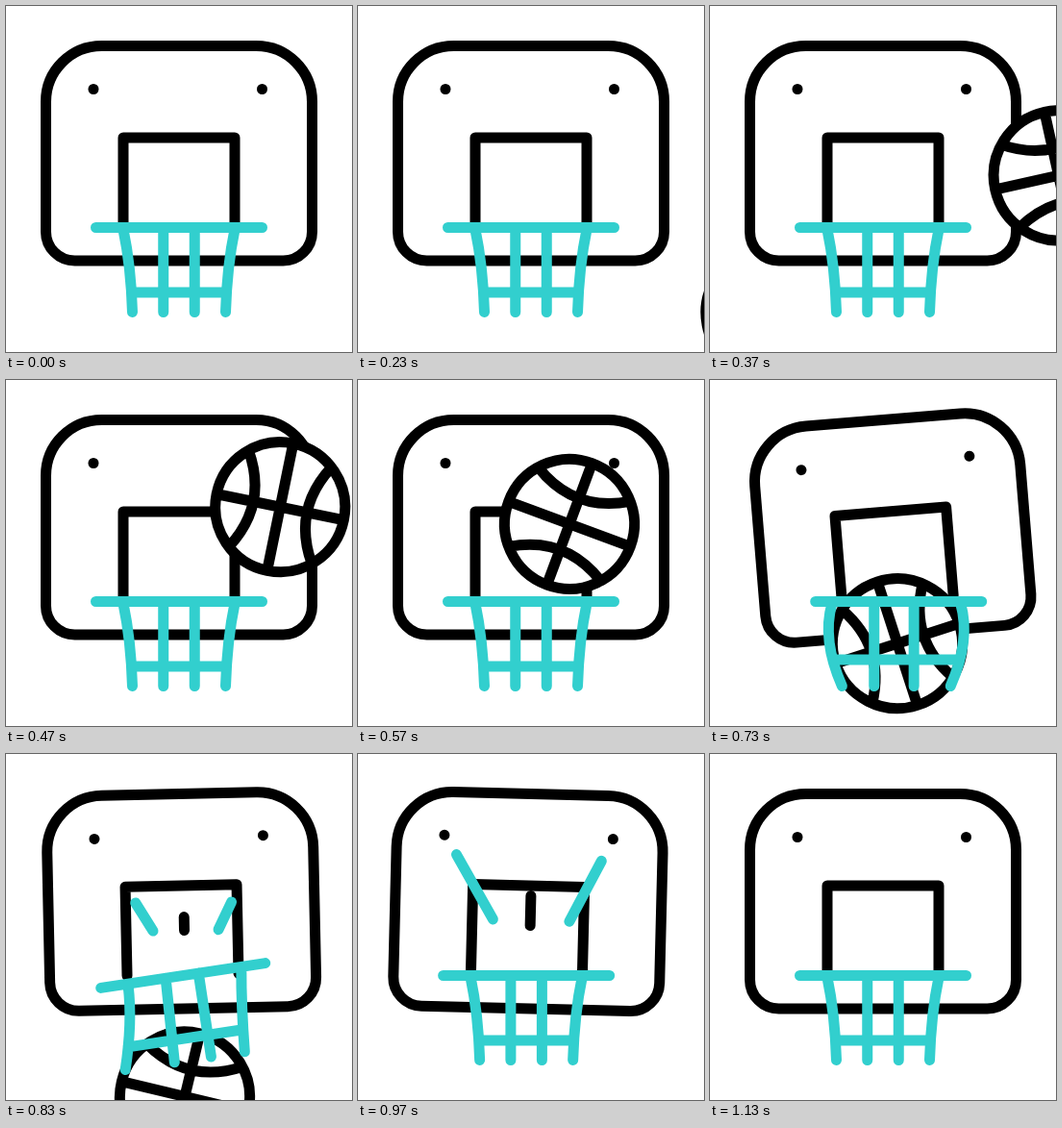
An HTML page with a canvas for the animation above (1670 ms loop, 360 by 360 pixels).

```html
<!DOCTYPE html>
<html lang="en">
<head>
<meta charset="utf-8">
<title>Basketball hoop</title>
<style>
  html, body { margin: 0; width: 100%; height: 100%; overflow: hidden; background: #fff; }
  canvas { display: block; }
</style>
</head>
<body>
<canvas id="stage" width="360" height="360"></canvas>
<script>
const LOOP = 1670, TEAL = '#32cfce', BLACK = '#000', RAD = Math.PI / 180;
const ctx = document.getElementById('stage').getContext('2d');

const progress = (t, from, to) => Math.min(1, Math.max(0, (t - from) / (to - from)));
const ease = (t, from, to) => (1 - Math.cos(Math.PI * progress(t, from, to))) / 2;
// Rises from 0 to 1, then falls back to 0.
const pulse = (t, from, peak, to) => ease(t, from, peak) - ease(t, peak, to);

// The ball rises to its apex, falls onto the rim, then pushes through the net.
function ballHeight(t) {
  const rise = 1 - Math.sin(Math.PI / 2 * progress(t, 200, 490));
  const fall = progress(t, 490, 700) ** 2;
  const push = Math.max(0, t - 700);
  return 131 + 226 * rise + 127 * fall + 0.45 * push + 0.0023 * push ** 2;
}

function stroke(color, draw) {
  ctx.strokeStyle = color;
  ctx.beginPath();
  draw();
  ctx.stroke();
}

function line(x1, y1, x2, y2) {
  ctx.moveTo(x1, y1);
  ctx.lineTo(x2, y2);
}

function curve(x1, y1, cx, cy, x2, y2) {
  ctx.moveTo(x1, y1);
  ctx.quadraticCurveTo(cx, cy, x2, y2);
}

function dot(x, y, r) {
  ctx.beginPath();
  ctx.arc(x, y, r, 0, 7);
  ctx.fill();
}

function place(x, y, degrees, draw) {
  ctx.save();
  ctx.translate(x, y);
  ctx.rotate(degrees * RAD);
  draw();
  ctx.restore();
}

function drawBoard() {
  stroke(BLACK, () => {
    ctx.roundRect(-138.5, 0, 277, 223.5, [58, 58, 30, 30]);
    ctx.moveTo(-58, 188);
    ctx.lineTo(-58, 95.5);
    ctx.lineTo(58, 95.5);
    ctx.lineTo(58, 188);
  });
  ctx.fillStyle = BLACK;
  dot(-89, 45, 5.5);
  dot(86.5, 45, 5.5);
}

function drawBurst(t) {
  const head = ease(t, 780, 900), tail = ease(t, 920, 1130);
  if (head <= tail) return;
  const ray = (color, x, dx, dy) => stroke(color, () =>
    line(x + dx * tail, 142 + dy * tail, x + dx * head, 142 + dy * head));
  ray(TEAL, -30, -46, -77);
  ray(BLACK, 2.5, 0, -36);
  ray(TEAL, 38, 37, -74);
}

function drawBall() {
  ctx.fillStyle = '#fff';
  dot(0, 0, 67.5);
  stroke(BLACK, () => {
    ctx.arc(0, 0, 67.5, 0, 2 * Math.PI);
    line(-67, 0, 67, 0);
    line(0, -67, 0, 67);
    for (const s of [-1, 1]) curve(-51, 44 * s, 0, 13 * s, 51, 44 * s);
  });
}

// bulge: the ball widens the net; pull: it drags the hem as it leaves.
function drawNet(bulge, pull) {
  const lean = -2.4 * bulge, gap = 16.25 + 4.5 * bulge;
  const top = 58 + 9 * bulge, belly = 50 + 28 * bulge, hem = 48.5 + 8 * bulge;
  const left = [lean - top, lean - belly - 9 * pull, lean - hem - 25.5 * pull];
  const right = [lean + top + 3 * pull, lean + belly + 5 * pull, lean + hem + 3 * pull];
  const barX = ([a, b, c]) => .06 * a + .36 * b + .58 * c;
  const barY = 67.5 - 7 * bulge - 2.5 * pull;
  const middle = 2 * lean;
  stroke(TEAL, () => {
    line(-86.5, 0, 86.5, 0);
    for (const [a, b, c] of [left, right]) curve(a, 2, b, 40, c, 88);
    line(middle - gap - 2 * pull, 0, middle - gap - 6 * pull, 88);
    line(middle + gap, 0, middle + gap, 88);
    line(barX(left), barY, barX(right), barY);
  });
}

function render(t) {
  const tilt = 2.5 * pulse(t, 760, 895, 1060) - 5.6 * pulse(t, 650, 760, 895);
  const bulge = pulse(t, 610, 740, 835), pull = pulse(t, 735, 830, 945);
  const ballX = 432 - 237 * ease(t, 200, 670) - 9 * ease(t, 730, 830);
  const ballSpin = 36 - 415 * ease(t, 200, 970);

  ctx.fillStyle = '#fff';
  ctx.fillRect(0, 0, 360, 360);
  ctx.lineWidth = 11;
  ctx.lineCap = ctx.lineJoin = 'round';
  place(180, 41.5, tilt, () => {
    drawBoard();
    drawBurst(t);
  });
  if (t > 200) place(ballX, ballHeight(t), ballSpin, drawBall);
  place(180 - 198 * Math.sin(tilt * RAD), 230.5, -8.6 * pull, () => drawNet(bulge, pull));
}

const start = performance.now();
function tick() {
  render((performance.now() - start) % LOOP);
  requestAnimationFrame(tick);
}
tick();
</script>
</body>
</html>
```
